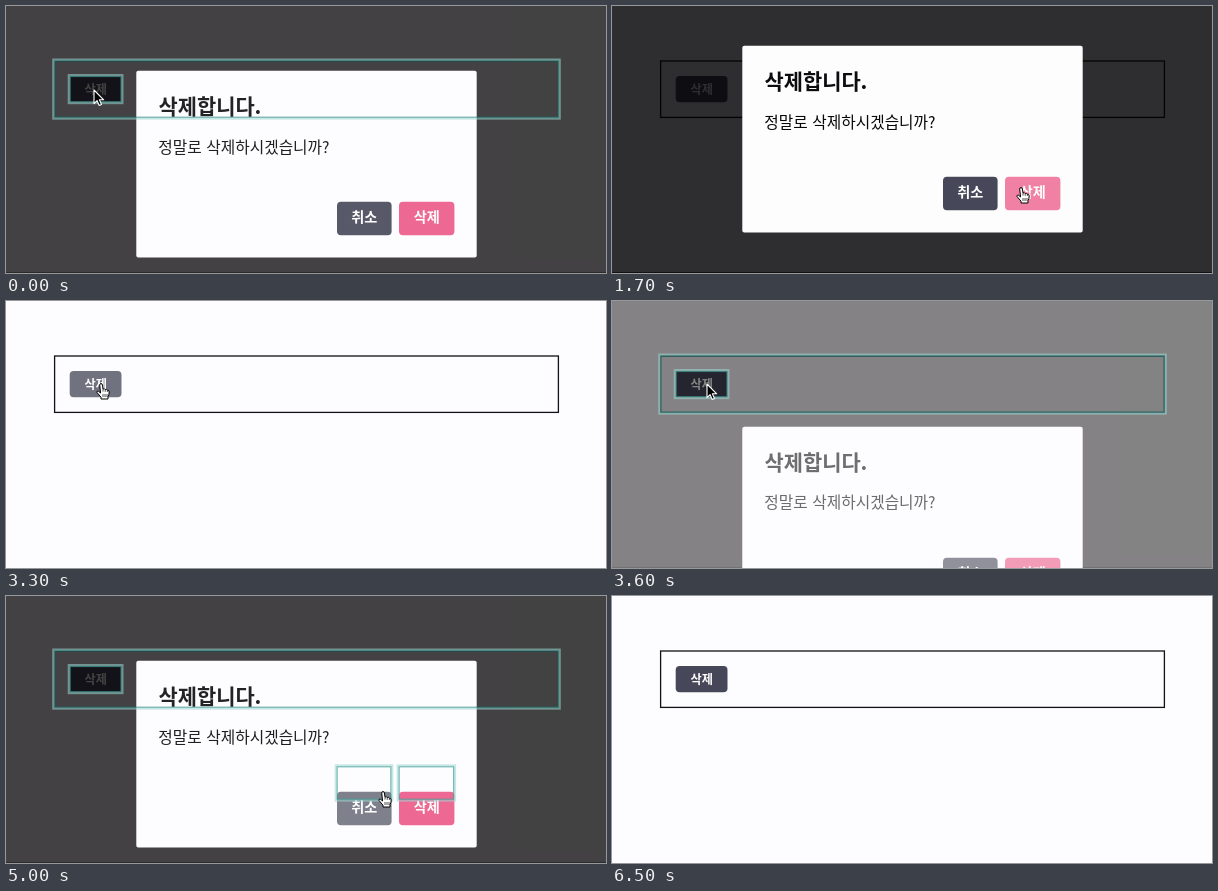
Animation, 600 px wide and 267 px high, one loop 7.6 s. Source, as an HTML page:

```html
<!DOCTYPE html>
<html lang="ko">
<head>
<meta charset="utf-8">
<title>삭제 확인</title>
<style>
  html, body { margin: 0; width: 100%; height: 100%; overflow: hidden; background: #fdfcfe; }
  svg { display: block; width: 100%; height: 100%; }
  text { font-family: "Noto Sans CJK KR", "Noto Sans CJK", sans-serif; }
  .label { font-weight: 700; fill: #fff; text-anchor: middle; }
  .flash rect { fill: none; }
  .halo { stroke: #9bd7d2; stroke-opacity: .55; stroke-width: 2.4; }
  .edge { stroke: #3d9a92; stroke-opacity: .65; stroke-width: 1.2; }
</style>
</head>
<body>
<svg viewBox="0 0 600 267" preserveAspectRatio="none">
  <rect width="600" height="267" fill="#fdfcfe"/>
  <rect x="48.6" y="55" width="503.8" height="56.4" fill="none" stroke="#111116" stroke-width="1.3"/>
  <g id="open">
    <rect id="openBg" x="63.7" y="70" width="51.8" height="26.2" rx="4" fill="#464859"/>
    <text class="label" x="89.8" y="87.5" font-size="12.2">삭제</text>
  </g>

  <g id="modal">
    <rect width="600" height="267" fill="#020002" fill-opacity=".82"/>
    <rect y="266" width="600" height="1" fill="#000" fill-opacity=".6"/>
    <g id="dialog">
      <rect x="130.3" y="39.8" width="340.4" height="186.6" rx="2" fill="#fefdfe"/>
      <text x="152.5" y="82.8" font-size="20.9" font-weight="700" fill="#0c0c0e">삭제합니다.</text>
      <text x="152.3" y="121.5" font-size="15.75" fill="#08080a">정말로 삭제하시겠습니까?</text>
      <g id="cancel">
        <rect x="331" y="170.8" width="54.6" height="33.4" rx="4" fill="#464859"/>
        <text class="label" x="358.2" y="191.2" font-size="14.2">취소</text>
      </g>
      <g id="remove">
        <rect x="393" y="170.8" width="55.4" height="33.4" rx="4" fill="#ec5a88"/>
        <text class="label" x="420.8" y="191.2" font-size="14.2">삭제</text>
      </g>
    </g>
  </g>

  <g id="pageFlash" class="flash"></g>
  <g id="buttonFlash" class="flash"></g>

  <g id="cursor">
    <path id="arrow" d="M0 0V13.6L3.1 10.7 5.2 15.5 7.5 14.5 5.4 9.8H9.7Z"
      fill="#000" stroke="#fff" stroke-width="1.1" stroke-linejoin="round"/>
    <g id="hand" fill="#fff" stroke="#000" stroke-linejoin="round">
      <path d="M-1.3 1Q-1.3 -.4 0 -.4T1.4 1L2 5Q3.6 4.2 4.2 5.6Q5.7 4.9 6.3 6.2Q8.2 5.8 8.2 8Q8.2 11 7 12.5V15H0V13.2L-4 8.5Q-4.5 6.7 -2.6 7.2L-.4 9Z"/>
      <path d="M2 5.2V7.6M4.2 5.8V7.8M6.3 6.4V8M2 10V13M4 10V13M6 10V13" fill="none" stroke-width=".7"/>
    </g>
  </g>
</svg>
<script>
const LOOP = 7600, STEP = 100;
const OPEN_MS = 420, CLOSE_MS = 200, SLIDE = 200;
const opens = [-210, 3497], closes = [2050, 4900];

// Pointer strokes: start ms, end ms, x and y reached
const home = [88, 84];
const strokes = [
  [400, 850, 193, 69], [850, 1600, 409, 182], [2600, 3300, 95, 83],
  [3600, 4100, 409, 212], [4200, 4800, 377, 196], [5900, 6550, 620, 40]
];

const $ = id => document.getElementById(id);
const clamp = k => Math.min(1, Math.max(0, k));
const smooth = k => k * k * (3 - 2 * k);
const show = (el, on) => el.style.display = on ? '' : 'none';
const soonAfter = (starts, t, ms) => starts.some(s => t > s && t < s + ms);

function opennessAt(t) {
  let p = 0;
  opens.forEach((s, i) => {
    if (t < s) return;
    const rise = clamp((t - s) / OPEN_MS), fall = clamp((t - closes[i]) / CLOSE_MS);
    p = 1 - (1 - rise) ** 3 - fall ** 3;
  });
  return p;
}

function pointAt(t) {
  let [x, y] = home;
  for (const [from, to, tx, ty] of strokes) {
    const k = smooth(clamp((t - from) / (to - from)));
    x += (tx - x) * k;
    y += (ty - y) * k;
  }
  return [x, y];
}

const areas = {};
for (const id of ['open', 'cancel', 'remove']) areas[id] = $(id).querySelector('rect').getBBox();

function isOver(id, [px, py]) {
  const { x, y, width, height } = areas[id];
  return px > x && px < x + width && py > y && py < y + height;
}

function addFlash(group, { x, y, width, height }) {
  for (const [name, d] of [['halo', .8], ['edge', -.5]]) {
    const r = document.createElementNS('http://www.w3.org/2000/svg', 'rect');
    const box = { x: x - d, y: y - d, width: width + 2 * d, height: height + 2 * d, class: name };
    for (const key in box) r.setAttribute(key, box[key]);
    group.append(r);
  }
}

addFlash($('pageFlash'), { x: 48.2, y: 54.5, width: 504.6, height: 57.2 });
addFlash($('pageFlash'), areas.open);
addFlash($('buttonFlash'), areas.cancel);
addFlash($('buttonFlash'), areas.remove);
$('buttonFlash').setAttribute('transform', 'translate(-.3 -.5)');

function draw(t) {
  const p = opennessAt(t), tip = pointAt(t);
  $('modal').style.opacity = Math.min(1, p * 1.03);
  $('dialog').setAttribute('transform', `translate(0 ${SLIDE * (1 - p)})`);

  let hand = false;
  for (const id in areas) {
    const over = (id === 'open') === (p === 0) && isOver(id, tip) && t > STEP;
    $(id).style.opacity = over ? .76 : 1;
    hand = hand || over;
  }
  show($('hand'), hand);
  show($('arrow'), !hand);
  $('cursor').setAttribute('transform', `translate(${tip})`);

  const flashing = soonAfter(opens, t, 400) || soonAfter(closes, t, 300);
  show($('pageFlash'), flashing);
  show($('buttonFlash'), soonAfter(closes, t, 600));
  $('openBg').setAttribute('rx', flashing ? 0 : 4);
}

const start = performance.now();
function tick() {
  const t = (performance.now() - start) % LOOP;
  draw(Math.floor(t / STEP) * STEP);
  requestAnimationFrame(tick);
}
tick();
</script>
</body>
</html>
```
